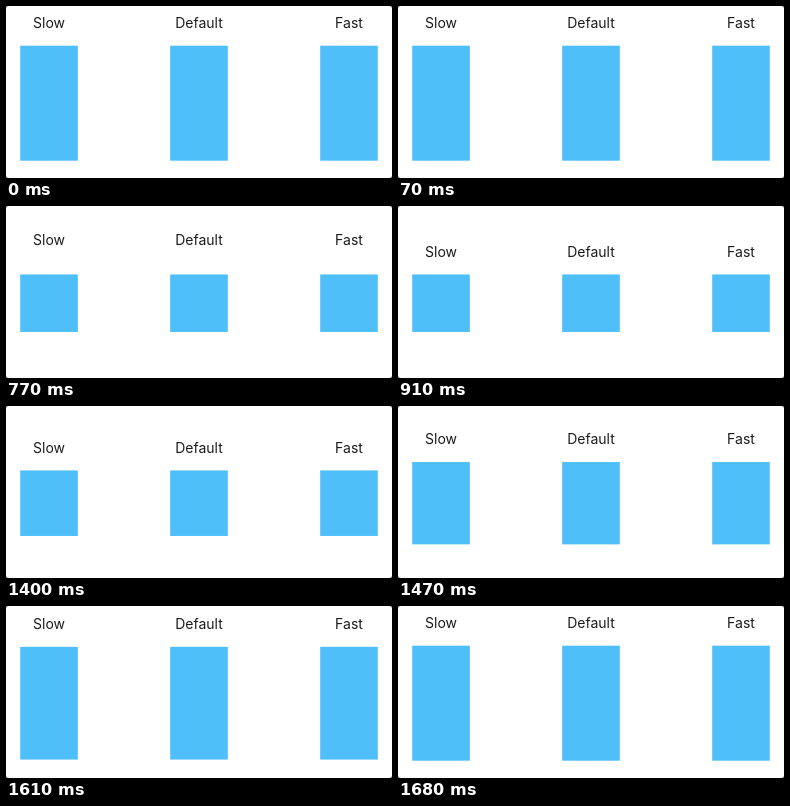
Animation, 386 px wide and 172 px high, one loop 2100 ms. Source, as an HTML page with a canvas:

```html
<!DOCTYPE html>
<html lang="en">
<head>
<meta charset="utf-8">
<style>
html, body { margin: 0; width: 100%; height: 100%; overflow: hidden; background: #555; }
canvas { display: block; width: 386px; height: 172px; }
</style>
</head>
<body>
<canvas id="stage"></canvas>
<script>
const W = 386, H = 172, LOOP = 2100, STEP = 70, DURATION = 350;
const SHRINK = 574, GROW = 1309;
const TALL = 115, SHORT = 57.5, MID = 97.2, BAR = 57.6;
const columns = [['Slow', 43], ['Default', 193], ['Fast', 343]];

const canvas = document.getElementById('stage');
const ctx = canvas.getContext('2d');
const ratio = window.devicePixelRatio || 1;
canvas.width = W * ratio;
canvas.height = H * ratio;
ctx.scale(ratio, ratio);

// cubic-bezier(.42, 0, .58, 1)
function ease(x) {
  if (x <= 0) return 0;
  if (x >= 1) return 1;
  let lo = 0, hi = 1, u;
  for (let i = 0; i < 24; i++) {
    u = (lo + hi) / 2;
    const bx = 1.26 * u * (1 - u) ** 2 + 1.74 * u * u * (1 - u) + u ** 3;
    if (bx < x) lo = u; else hi = u;
  }
  return u * u * (3 - 2 * u);
}

function draw(t) {
  const shrink = ease((t - SHRINK) / DURATION);
  const grow = ease((t - GROW) / DURATION);
  const labelShift = (shrink - grow) * (TALL - SHORT) / 2;
  // Bars collapse at once, then grow smoothly.
  const height = t < SHRINK ? TALL : SHORT + (TALL - SHORT) * grow;

  ctx.fillStyle = '#555';
  ctx.fillRect(0, 0, W, H);
  ctx.fillStyle = '#fff';
  ctx.beginPath();
  ctx.roundRect(0, 0, W, H, 3);
  ctx.fill();

  ctx.font = '14px Inter, "Liberation Sans", sans-serif';
  ctx.textAlign = 'center';
  for (const [label, x] of columns) {
    ctx.fillStyle = '#4ebff9';
    ctx.fillRect(x - BAR / 2, MID - height / 2, BAR, height);
    ctx.fillStyle = '#1c1c1c';
    ctx.fillText(label, x, 22 + labelShift);
  }
}

function tick() {
  const t = performance.now() % LOOP;
  draw(Math.floor(t / STEP) * STEP);
  requestAnimationFrame(tick);
}
tick();
</script>
</body>
</html>
```
